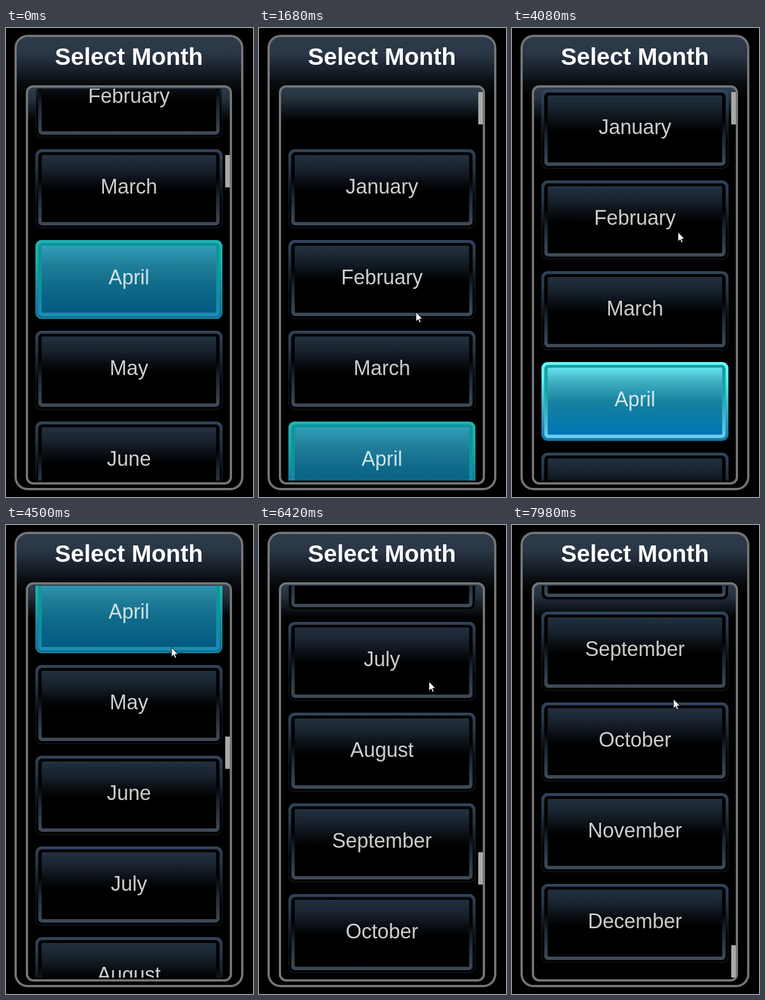
An HTML page that plays this animation: 436x827 px, repeating every 8 s.

```html
<!DOCTYPE html>
<html lang="en">
<head>
<meta charset="utf-8">
<title>Month picker</title>
<style>
  html, body { margin: 0; width: 100%; height: 100%; overflow: hidden; background: #000; }
  body { position: relative; font-family: "Liberation Sans", Arial, sans-serif; text-align: center; }
  div { position: absolute; box-sizing: border-box; }

  .panel { border: 4px solid #757575; }
  #outer {
    left: 15px; top: 12px; width: 404px; height: 803px; border-radius: 23px;
    background: linear-gradient(#2d3b4a 0, #2a3746 28px, #17202b 58px, #090d12 80px, #000 108px) #000;
  }
  #inner {
    left: 35px; top: 101px; width: 364px; height: 704px; border-radius: 13px;
    background: linear-gradient(#2e3d4e 0, #26333f 18px, #121a23 38px, #000 60px) #000;
  }
  #title {
    left: 0; top: 27px; width: 434px; line-height: 48px;
    font-size: 42px; font-weight: bold; color: #fff;
  }
  #list { left: 39px; top: 107px; width: 356px; height: 691px; overflow: hidden; }
  #thumb { left: 387px; top: 113px; width: 8px; height: 57px; background: #a9a9a9; }

  .month {
    --rim: #30425a 0, #22313f 25%, #0b1118 52%, #000 70%;
    --ring: #000 0, #000 35%, #1f2935 62%, #3f4b59 100%;
    --fill: #223140 0, #17212c 22%, #070b0f 42%, #000 55%;
    --edge: rgba(90, 120, 150, .27);
    left: 13px; top: 0; width: 330px; height: 139px; border-radius: 11px;
    background: linear-gradient(var(--rim));
    box-shadow: inset 0 0 0 1px var(--edge);
  }
  .month.selected {
    --rim: #1db3b5 0, #18a9ad 30%, #12809c 70%, #0d7196 100%;
    --ring: #0c9797 0, #0b9795 45%, #1689a6 75%, #1c8db4 100%;
    --fill: #309fba 0, #227f9b 28%, #0f6b8a 58%, #045a80 100%;
    --edge: rgba(50, 200, 210, .4);
  }
  .month.pressed {
    --rim: #fff 0, #fff 15%, #a5a9ad 55%, #33465e 95%;
    --ring: #30363e 0, #4a4f55 30%, #c0c2c4 70%, #fff 95%;
    --fill: #5f97d4 0, #37669c 25%, #124579 52%, #003f80 100%;
    --edge: transparent;
  }
  .month.selected.pressed {
    --rim: #66fafa 0, #5cf0f2 20%, #35abc8 60%, #1478a8 100%;
    --ring: #1a9ea0 0, #1ca5a8 40%, #45b9d0 75%, #6acff0 100%;
    --fill: #62e2ee 0, #3eadc0 22%, #17809f 52%, #0076b4 100%;
  }
  .ring {
    left: 5px; top: 5px; width: 320px; height: 129px; border-radius: 7px;
    background: linear-gradient(var(--ring));
  }
  .fill {
    left: 6px; top: 5px; width: 308px; height: 118px; border-radius: 2px;
    background: linear-gradient(var(--fill));
    font-size: 36px; line-height: 112px; color: rgba(255, 255, 255, .8);
  }
  #cursor { position: absolute; left: 0; top: 0; }
</style>
</head>
<body>
<div id="outer" class="panel"></div>
<div id="title">Select Month</div>
<div id="inner" class="panel"></div>
<div id="list"></div>
<div id="thumb"></div>
<svg id="cursor" width="14" height="21" viewBox="-1 -1 14 21">
  <path d="M0 0V16.5L3.8 13L6.3 18.6L8.8 17.5L6.4 12H11.6Z" fill="#fff" stroke="#000" stroke-width="1"/>
</svg>
<script>
const LOOP = 8000, TICK = 60;
const PITCH = 160, REST = 109, LIST_TOP = 107, SELECTED = 3;
const MAX_THUMB = 628, THUMB_RATIO = 0.517;

// [time, y of the first month]
const scrollKeys = [
  [0, -106], [1020, -106], [1140, -28], [1380, 130], [1860, 264], [1980, 264],
  [2460, 418], [2580, 422], [2700, 422], [2760, 425], [3000, 425],
  [3060, 180], [3120, 180], [3180, REST],
  [4080, REST], [4200, -150], [4320, -310], [4500, -393],
  [5700, -393], [5820, -530], [6060, -700], [6300, -779], [6360, -779], [6420, -789],
  [7560, -789], [7680, -900], [7860, -1065], [7980, -1127]
];
// [time, x, y]
const cursorKeys = [
  [300, 394, 91], [780, 280, 178], [900, 277, 180], [1140, 273, 350],
  [1860, 278, 551], [1980, 278, 551], [2460, 284, 705], [3480, 284, 705], [3600, 280, 718],
  [3720, 280, 718], [4080, 293, 360], [4500, 292, 216], [4680, 292, 216],
  [5400, 300, 672], [5520, 300, 672], [5700, 295, 444], [6060, 299, 310],
  [6420, 300, 276], [6540, 300, 276], [7200, 298, 690], [7380, 298, 690],
  [7620, 290, 480], [7980, 285, 307]
];
// [month index, from, to]
const presses = [[1, 840, 1080], [3, 3780, 4140], [6, 5460, 5760], [9, 7320, 7620]];

const $ = id => document.getElementById(id);
const monthNames = ["January", "February", "March", "April", "May", "June", "July",
  "August", "September", "October", "November", "December"];

const months = monthNames.map((name, i) => {
  const month = document.createElement("div");
  month.className = "month";
  month.classList.toggle("selected", i === SELECTED);
  month.innerHTML = `<div class="ring"><div class="fill">${name}</div></div>`;
  $("list").append(month);
  return month;
});

function sample(keys, t) {
  const next = keys.findIndex(key => key[0] > t);
  if (next < 0) return keys[keys.length - 1].slice(1);
  if (next === 0) return keys[0].slice(1);
  const a = keys[next - 1], b = keys[next];
  const k = (t - a[0]) / (b[0] - a[0]);
  return a.slice(1).map((v, i) => Math.round(v + (b[i + 1] - v) * k));
}

function render(t) {
  const [y] = sample(scrollKeys, t);
  months.forEach((month, i) => {
    month.style.transform = `translateY(${y + i * PITCH - LIST_TOP}px)`;
    month.classList.toggle("pressed", presses.some(([m, from, to]) => m === i && t >= from && t < to));
  });
  const thumb = Math.min(MAX_THUMB, Math.max(0, Math.round((REST - y) * THUMB_RATIO)));
  $("thumb").style.transform = `translateY(${thumb}px)`;

  const [cx, cy] = sample(cursorKeys, t);
  $("cursor").style.visibility = t < cursorKeys[0][0] ? "hidden" : "visible";
  $("cursor").style.transform = `translate(${cx - 1}px, ${cy - 1}px)`;
}

const start = performance.now();
function frame() {
  const t = (performance.now() - start) % LOOP;
  render(Math.floor(t / TICK) * TICK);
  requestAnimationFrame(frame);
}
frame();
</script>
</body>
</html>
```
